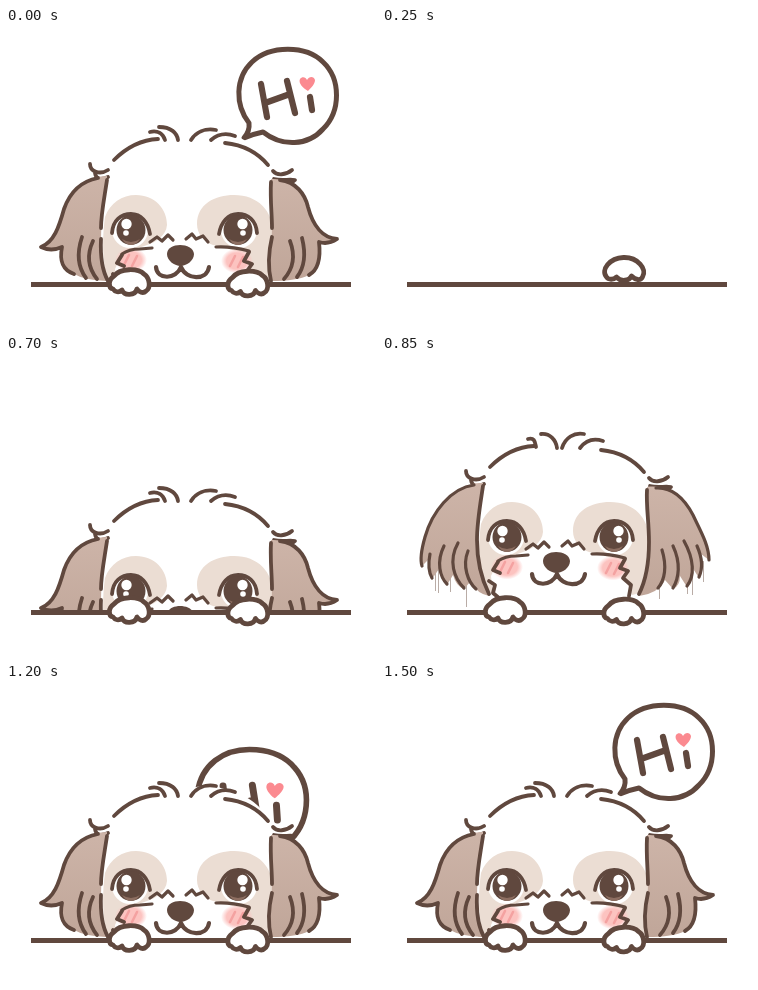
Recreate the animation shown at these times as an HTML page. Size 370 by 300 pixels, loop 2 s.

```html
<!DOCTYPE html>
<html lang="en">
<head>
<meta charset="utf-8">
<title>Peeking puppy</title>
<style>
html, body { margin: 0; width: 100%; height: 100%; overflow: hidden; background: #fff; }
svg { display: block; width: 100vw; height: 100vh; }
.ink { fill: none; stroke: #60483e; stroke-width: 3.8; stroke-linecap: round; stroke-linejoin: round; }
.thin { stroke-width: 3.2; }
.bold { stroke-width: 4.8; }
.letter { stroke-width: 6.2; }
.white { fill: #fff; }
.coat { fill: url(#coat); }
.patch { fill: #ebddd3; }
.dark { fill: #60483e; }
</style>
</head>
<body>
<svg viewBox="0 0 370 300">
  <defs>
    <linearGradient id="coat" x2="0" y2="1">
      <stop offset="0" stop-color="#cdb4a8"/>
      <stop offset="1" stop-color="#c0a699"/>
    </linearGradient>
    <radialGradient id="blush">
      <stop offset=".65" stop-color="#fcc3c0"/>
      <stop offset="1" stop-color="#fcc3c0" stop-opacity="0"/>
    </radialGradient>
    <clipPath id="above"><rect width="370" height="256"/></clipPath>

    <path id="rest" class="ink bold white" d="M107 261C102 260 102 252 108 248C114 240 132 240 138 246C144 250 145 260 140 263C137 266 133 264 131 261C129 268 118 268 116 262C113 265 109 264 107 261Z"/>
    <path id="raised" class="ink bold white" d="M106 249C100 242 109 230 123 229.500C137 229 147 241 142 249C140 253 135 252 131 248C129 253 120 254 116 249C113 252 108 252 106 249Z"/>

    <g id="eye">
      <circle r="18" class="white"/>
      <path class="ink" d="M-18 3C-17 -10 -9 -16 1 -16C11 -16 18 -8 20 4"/>
      <ellipse cx="1" rx="14.500" ry="15" class="dark"/>
      <path d="M-8 9Q1 15 10 9Q6 15 1 15Q-4 15 -8 9Z" fill="#8d6e61"/>
      <circle cx="-3.500" cy="-6" r="5.200" class="white"/>
      <circle cx="-4" cy="3" r="2.800" class="white"/>
    </g>
    <g id="cheek">
      <ellipse rx="16" ry="12.500" fill="url(#blush)"/>
      <path d="M-7 5L-2 -5M1 6L6 -4" fill="none" stroke="#f4a2a1" stroke-width="2.600" stroke-linecap="round"/>
    </g>
  </defs>
  <rect width="370" height="300" fill="#fff"/>

  <g clip-path="url(#above)">
    <g id="bubble">
      <path class="ink white" style="stroke-width:5" d="M243 95C229 77 229 50 246 34C264 17 300 17 317 34C335 51 335 83 317 101C302 118 276 119 257 104Q247 106 238 110Q244 103 243 95Z"/>
      <path class="ink letter" d="M255 56L261 89M281 53L289 85M259 75L284 66M304 69L306 82"/>
      <path fill="#fb8a90" d="M302 63C297 60 292 55 294 51C296 48 300 49 301 52C303 48 308 48 309 52C309 56 305 60 302 63Z"/>
    </g>

    <g id="head">
      <g id="face">
        <path class="white" d="M101 145C106 125 130 112 150 109L180 107Q190 101 208 102L232 109C250 117 264 130 267 150L266 256L250 270H110L98 245Z"/>
        <path class="patch" d="M99 189C104 175 116 167 130 167C149 167 161 181 161 197C160 208 150 214 141 217L116 226L109 241L111 259L103 254C96 240 96 210 99 189Z"/>
        <path class="patch" d="M191 196C191 176 209 167 228 167C252 167 267 183 267 205C263 225 265 240 262 257L250 260L243 242L242 226L207 217C198 214 191 206 191 196Z"/>
        <use href="#cheek" x="125" y="232"/>
        <use href="#cheek" x="231" y="233"/>
        <use href="#eye" x="124" y="202"/>
        <use href="#eye" transform="translate(233 202) scale(-1 1)"/>
        <path class="ink" d="M108 132C118 122 132 112 152 111M219 115C238 117 252 125 262 137"/>
        <path class="ink" d="M84 136C84 144 94 147 102 142M89 145C90 152 96 152 102 149M267 143C271 148 280 147 286 142M268 151C275 153 283 151 289 152Q284 157 277 156"/>
        <path class="ink thin" d="M144 214L151 209L156 213L162 207L167 212M180 211L186 206L190 211L197 208L202 214M116 226Q123 221 134 221M134 221L146 220M210 219Q224 218 243 223"/>
        <path class="ink" d="M116 227L111 235L118 238M107 246L113 250L111 258L117 263M243 224L238 233L246 236L241 243L249 250L247 261"/>
        <path class="dark" d="M161 226C161 214 187 214 188 226C188 233 180 238 174.500 238C169 238 161 233 161 226Z"/>
        <path class="ink" style="stroke-width:4.200" d="M150 239C151 252 170 252 175 239C180 252 201 253 203 239"/>
      </g>

      <g id="earsDown">
        <path class="coat" d="M101 148C79 148 65 162 58 181C53 199 48 214 35 219Q45 224 56 219C53 234 57 242 68 246Q78 252 101 253C95 238 94 222 95 211C95 190 101 170 101 148Z"/>
        <path class="coat" d="M265 151C285 150 297 161 302 179C307 198 317 210 331 211Q322 217 313 214C315 231 312 242 303 247Q291 253 265 253C262 234 266 218 266 198C266 180 263 165 265 151Z"/>
        <path class="ink" d="M92 150C76 153 64 164 58 181C53 199 48 214 35 219Q45 224 56 219C53 234 57 242 68 246M76 209C71 224 71 238 80 250M87 213C80 228 83 241 91 251M101 152C98 172 95 186 95 200M95 211C94 232 97 244 102 253"/>
        <path class="ink" d="M274 152C290 154 299 166 302 179C307 198 317 210 331 211Q322 217 313 214C315 231 312 242 303 247M296 210C300 226 298 240 291 249M284 213C290 229 286 242 278 251M265 154C264 172 266 186 266 200M266 209C262 226 262 240 265 253"/>
        <path class="ink" d="M144 104C152 102 157 106 159 112M153 99C165 99 171 105 172 112M185 112C190 104 199 100 210 102M205 112C212 106 221 105 229 108"/>
      </g>

      <g id="earsUp">
        <path d="M53.500 204V235M56.500 208V237M68.500 222V236M84.500 224V251M277.500 224V243M305.500 219V238M310.500 212V239M321.500 205V226" fill="none" stroke="#b9aca6"/>
        <path class="coat" d="M101 127C72 126 51 154 43 181C39 195 38 204 40 210L48 202Q46 214 50 223L57 213Q58 223 65 229L71 219Q74 230 82 233L88 226Q96 238 107 240C98 220 95 204 95 188C95 165 101 148 101 127Z"/>
        <path class="coat" d="M265 131C286 128 302 142 311 159C318 174 327 189 327 204L319 198Q322 214 317 222L310 211Q311 225 305 231L298 220Q298 230 291 233L283 224Q277 237 257 240C265 220 267 206 267 187C267 166 265 148 265 131Z"/>
        <path class="ink thin" d="M92 129C69 132 50 156 43 181C39 195 38 204 40 210M48 198Q45 213 50 222M62 190C54 206 58 221 65 228M76 187C66 205 72 222 82 232M86 195C80 210 86 226 94 233"/>
        <path class="ink thin" d="M274 132C291 131 303 144 311 159C318 174 327 189 327 204M315 190Q323 208 317 221M302 185C312 203 313 220 305 230M291 190C299 207 297 222 291 232M280 194C285 210 283 224 276 232"/>
        <path class="ink" d="M101 130C98 150 95 166 95 184C95 206 99 222 107 238M265 134C264 150 267 166 267 186C267 206 265 222 257 238"/>
        <path class="ink" d="M146 83C153 81 153 87 154 91M159 78C168 77 174 84 175 92M180 92C183 82 192 76 202 78M198 92C204 84 212 82 221 85"/>
      </g>
    </g>
  </g>

  <rect x="25" y="254" width="320" height="5" fill="#60483e"/>
  <use id="left"/>
  <use id="right"/>
</svg>
<script>
const LOOP = 2000;
const $ = id => document.getElementById(id);
const show = (id, on) => $(id).setAttribute("display", on ? "inline" : "none");

// Each pose holds until the next start time. Bubble: dx, dy, scale, tilt.
const seated = { left: "rest", right: "rest", head: 0 };
const poses = [
  { at: 0, ...seated, bubble: [0, 0, 1, 0] },
  { at: 100 },
  { at: 250, right: "raised" },
  { at: 400, right: "rest" },
  { at: 550, left: "raised", right: "rest" },
  { at: 700, ...seated, head: 33 },
  { at: 850, ...seated, bounce: true },
  { at: 1000, ...seated },
  { at: 1100, ...seated, bubble: [-46, 69, 1.1, 6] },
  { at: 1200, ...seated, bubble: [-36, 50, 1.12, 5] },
  { at: 1300, ...seated, bubble: [-13, 21, 1.04, 2] },
  { at: 1400, ...seated, bubble: [-3, 5, 1, 0] },
  { at: 1500, ...seated, bubble: [0, 0, 1, 0] }
];

function setPaw(id, shape, x, y) {
  show(id, shape);
  if (shape) $(id).setAttribute("href", "#" + shape);
  $(id).setAttribute("x", x);
  $(id).setAttribute("y", y);
}

function draw(ms) {
  const t = ms % LOOP;
  const pose = poses.findLast(p => p.at <= t);
  const hasHead = pose.head !== undefined;
  setPaw("left", pose.left, 0, 0);
  setPaw("right", pose.right, 118.5, pose.right === "rest" ? 1.5 : 0);

  show("head", hasHead);
  if (hasHead) {
    $("head").setAttribute("transform", `translate(0 ${pose.head})`);
    $("face").setAttribute("transform", `translate(0 ${pose.bounce ? -21 : 0})`);
    show("earsUp", pose.bounce);
    show("earsDown", !pose.bounce);
  }

  show("bubble", pose.bubble);
  if (pose.bubble) {
    const [x, y, k, tilt] = pose.bubble;
    $("bubble").setAttribute("transform",
      `translate(${282 + x} ${68 + y}) rotate(${tilt}) scale(${k}) translate(-282 -68)`);
  }
}

const start = performance.now();
function tick() {
  draw(performance.now() - start);
  requestAnimationFrame(tick);
}
tick();
</script>
</body>
</html>
```
